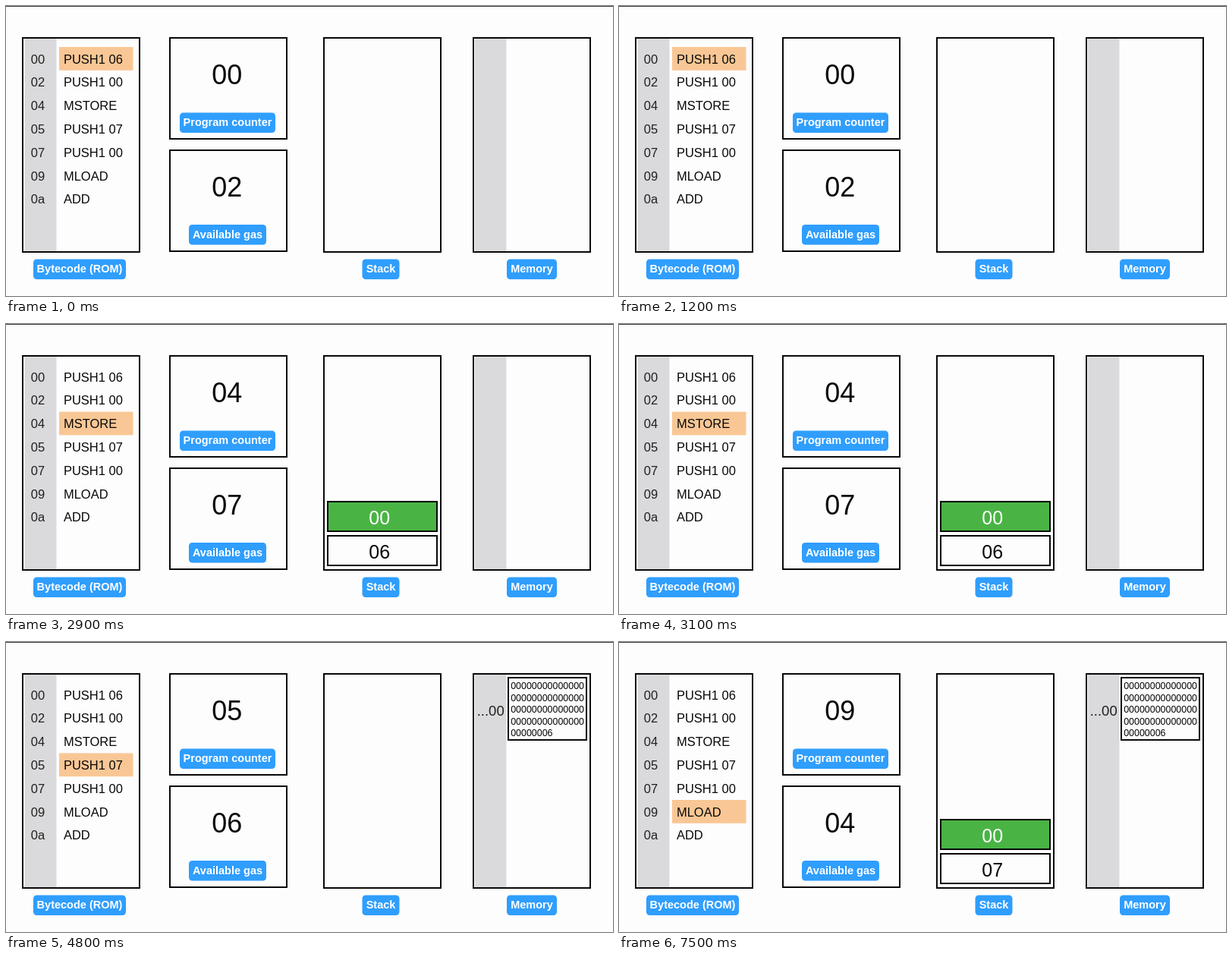
These frames come from a looping animation (800 px wide and 382 px high, 8 s). An HTML page:

```html
<!DOCTYPE html>
<html lang="en">
<head>
<meta charset="utf-8">
<title>Stack machine</title>
<style>
  html, body { margin: 0; width: 100%; height: 100%; overflow: hidden; background: #fefdfe; }
  svg { display: block; width: 100vw; height: 100vh; }
  text { font-family: "Liberation Sans", Arial, sans-serif; fill: #080808; }
</style>
</head>
<body>
<svg id="stage" viewBox="0 0 800 382"></svg>
<script>
const LOOP = 8000;
const ROW = 30.8;
const program = [
  ["00", "PUSH1 06"], ["02", "PUSH1 00"], ["04", "MSTORE"], ["05", "PUSH1 07"],
  ["07", "PUSH1 00"], ["09", "MLOAD"], ["0a", "ADD"]
];
// Each step selects the program line of the same index; stacks list the bottom first.
const steps = [
  { at: 0, gas: "02", stack: [] },
  { at: 1400, gas: "08", stack: ["06"] },
  { at: 2900, gas: "07", stack: ["06", "00"] },
  { at: 4600, gas: "06", stack: [], memory: true },
  { at: 6100, gas: "05", stack: ["07"], memory: true },
  { at: 7500, gas: "04", stack: ["07", "00"], memory: true }
];

const stage = document.getElementById("stage");

function add(parent, tag, attrs, content = "") {
  const node = document.createElementNS("http://www.w3.org/2000/svg", tag);
  for (const key in attrs) node.setAttribute(key, attrs[key]);
  node.textContent = content;
  parent.append(node);
  return node;
}
const box = (parent, x, y, width, height, attrs) =>
  add(parent, "rect", { x, y, width, height, ...attrs });
const frame = (parent, x, y, width, height, fill = "none") =>
  box(parent, x, y, width, height, { fill, stroke: "#080808", "stroke-width": 2 });
const write = (parent, content, x, y, size, attrs) =>
  add(parent, "text", { x, y, "font-size": size, ...attrs }, content);
const centered = { "text-anchor": "middle" };

function badge(content, x, y, width) {
  box(stage, x, y, width, 26.5, { rx: 4.5, fill: "#2f9efd" });
  write(stage, content, x + width / 2, y + 17.5, 14.5,
    { ...centered, "font-weight": "bold", style: "fill:#fff" });
}

box(stage, 0, 0, 800, 1, { fill: "#3c3c3e" });
for (const x of [25, 618]) box(stage, x, 43, 41.5, 281, { fill: "#dad9db" });
const highlight = box(stage, 70, 54, 97.5, ROW, { fill: "#f9c795" });
for (const x of [22, 419, 616]) frame(stage, x, 42, 154, 282);
frame(stage, 216, 42, 154, 133);
frame(stage, 216, 190, 154, 133);

program.forEach(([address, code], i) => {
  const y = 75.6 + i * ROW;
  write(stage, address, 32.8, y, 16.5, { style: "fill:#202020" });
  write(stage, code, 75.9, y, 16.5);
});

const counter = write(stage, "", 291.3, 103, 36, centered);
const gas = write(stage, "", 291.3, 251, 36, centered);

badge("Program counter", 229, 140.5, 126);
badge("Available gas", 241, 288, 102);
badge("Bytecode (ROM)", 36, 333.5, 122);
badge("Stack", 469.5, 333.5, 49);
badge("Memory", 660, 333.5, 66);

const slots = [279, 234].map(y => {
  const group = add(stage, "g", {});
  return {
    group,
    rect: frame(group, 424, y, 144, 39),
    label: write(group, "", 492.2, y + 30, 25, centered)
  };
});

const memory = add(stage, "g", {});
write(memory, "...00", 638.7, 97, 18.5, { ...centered, style: "fill:#202020" });
frame(memory, 662, 47, 103, 82, "#fefdfe");
const word = "6".padStart(64, "0");
for (let i = 0; i < 5; i++)
  write(memory, word.slice(i * 14, i * 14 + 14), 665.2, 62.4 + i * 15.4, 12.45);

const show = (node, visible) =>
  node.setAttribute("visibility", visible ? "visible" : "hidden");

function render(time) {
  const index = steps.findLastIndex(step => step.at <= time);
  const step = steps[index];
  highlight.setAttribute("y", 54 + index * ROW);
  counter.textContent = program[index][0];
  gas.textContent = step.gas;
  slots.forEach(({ group, rect, label }, i) => {
    const isTop = i === step.stack.length - 1;
    show(group, i < step.stack.length);
    rect.setAttribute("fill", isTop ? "#49b444" : "#fefdfe");
    label.style.fill = isTop ? "#fff" : "#080808";
    label.textContent = step.stack[i] ?? "";
  });
  show(memory, step.memory);
}

const start = performance.now();
function tick() {
  render((performance.now() - start) % LOOP);
  requestAnimationFrame(tick);
}
tick();
</script>
</body>
</html>
```
